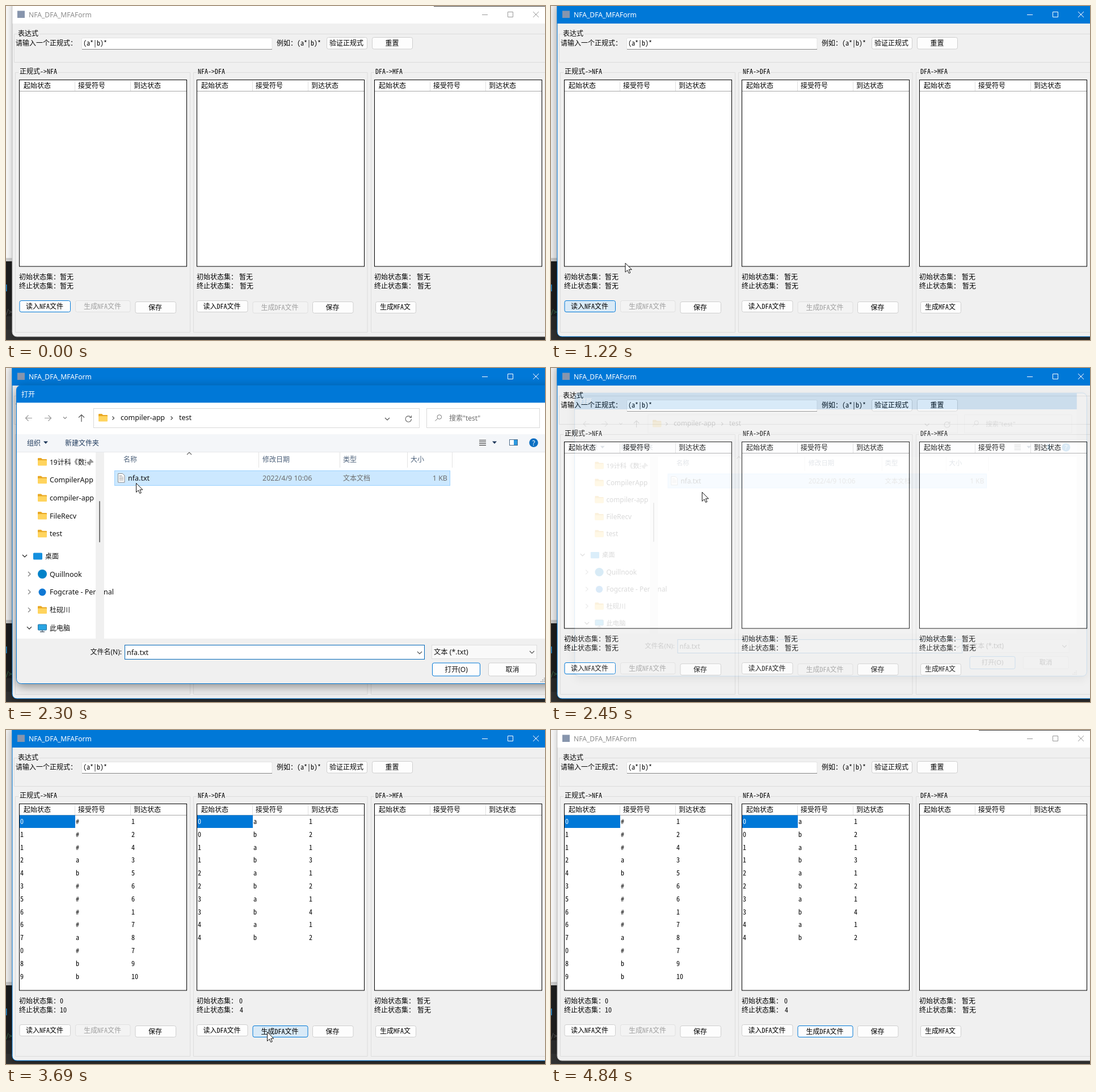
Recreate the animation shown at these times as an HTML page. Size 950x590 px, loop 4920 ms.

```html
<!DOCTYPE html>
<html lang="zh-CN">
<head>
<meta charset="utf-8">
<title>NFA_DFA_MFAForm</title>
<style>
html, body { margin: 0; height: 100%; overflow: hidden; background: #333; }
svg { display: block; width: 100vw; height: 100vh; }
text { white-space: pre; }
.form { font: 12px "Noto Sans Mono CJK SC", "Noto Sans CJK SC", "Noto Sans CJK", monospace; }
.ui { font-family: "Noto Sans", "Open Sans", "Noto Sans CJK SC", "Noto Sans CJK", sans-serif; }
.shadow { filter: drop-shadow(0 5px 9px rgba(0, 0, 0, .42)); }
.soft { filter: drop-shadow(0 3px 6px rgba(0, 0, 0, .22)); }
</style>
</head>
<body>
<svg id="stage" viewBox="0 0 950 590"></svg>
<script>
const LOOP = 4920, BLUE = '#0078d7', INK = '#111', GREY = '#6d6d6d';
const NFA = '0#1 1#2 1#4 2a3 4b5 3#6 5#6 6#1 6#7 7a8 0#7 8b9 9b10'.split(' ');
const DFA = '0a1 0b2 1a1 1b3 2a1 2b2 3a1 3b4 4a1 4b2'.split(' ');

// Pointer way points: step, x, y
const TRACK = [
  [1, 470, 557], [4, 265, 545], [7, 103, 519], [8, 93, 523], [15, 93, 523],
  [21, 318, 107], [23, 318, 107], [27, 229, 203], [31, 229, 203], [37, 450, 298],
  [38, 450, 298], [39, 560, 442], [40, 604, 490], [42, 555, 525], [45, 465, 530],
  [48, 460, 533], [49, 460, 533], [53, 749, 554], [56, 845, 578]
];

const rect = (x, y, w, h, fill, stroke = 'none', r = 0) =>
  `<rect x="${x}" y="${y}" width="${w}" height="${h}" rx="${r}" fill="${fill}" stroke="${stroke}"/>`;
const path = (d, stroke, width = 1, fill = 'none') =>
  `<path d="${d}" stroke="${stroke}" stroke-width="${width}" fill="${fill}"/>`;
const disc = (x, y, r, fill) => `<circle cx="${x}" cy="${y}" r="${r}" fill="${fill}"/>`;
const label = (x, y, s, fill = '#000', anchor = 'start') =>
  `<text class="form" x="${x}" y="${y}" fill="${fill}" text-anchor="${anchor}">${s}</text>`;
const ui = (x, y, s, fill = INK, size = 12, anchor = 'start') =>
  `<text class="ui" x="${x}" y="${y}" fill="${fill}" font-size="${size}" text-anchor="${anchor}">${s}</text>`;

const chevron = (x, y, dir, color = '#555', s = 4) => {
  const turn = { down: 0, up: 180, right: -90 }[dir];
  return `<g transform="translate(${x} ${y}) rotate(${turn})">` +
    path(`M${-s} ${-s / 2}L0 ${s / 2}L${s} ${-s / 2}`, color, 1.2) + '</g>';
};
const triangle = (x, y) => path(`M${x - 4} ${y - 2}h8l-4 4.5z`, 'none', 0, '#1e395b');
const folder = (x, y) =>
  path(`M${x} ${y + 12}v-11q0-1 1-1h5l2 2h7q1 0 1 1v9z`, 'none', 0, '#e8a825') +
  rect(x, y + 4, 16, 9.5, '#ffd45e', 'none', 1);
const cross = (x, y, color) => path(`M${x - 5} ${y - 5}l10 10m0-10l-10 10`, color);

// look: '' | 'off' | 'focus' | 'hover'
function button(x, y, w, h, s, cx, base, look = '') {
  const active = look === 'focus' || look === 'hover';
  return rect(x, y, w, h, { hover: '#d9eaf7', off: '#f3f3f3' }[look] || '#fdfdfd',
      active ? BLUE : look === 'off' ? '#e0e0e0' : '#cfcfcf', 3) +
    label(cx, base, s, look === 'off' ? '#a0a0a0' : '#000', 'middle');
}

function grid(x, rows) {
  let out = rect(x + .5, 130.5, 295, 329.5, '#fff', '#000') +
    path(`M${x + 1} 150.5h294`, '#a8a8a8') +
    path(`M${x + 98.5} 132v18m98-18v18`, '#dedede');
  ['起始状态', '接受符号', '到达状态'].forEach((s, i) => out += label(x + [8, 104, 202][i], 145, s));
  if (rows.length) out += rect(x + 1, 150.5, 98, 22.5, BLUE);
  rows.forEach((row, i) => {
    const y = 166 + i * 22.8;
    out += label(x + 2, y, row[0], i ? '#000' : '#fff') +
      label(x + 100, y, row[1]) + label(x + 198, y, row.slice(2));
  });
  return out;
}

function backdrop(focused) {
  return rect(0, 0, 950, 590, '#333') + rect(0, 0, 30, 447, '#f7f7f7') +
    rect(0, 445, 30, 6, '#cfcfcf') + rect(0, 451, 30, 121, '#1e1e1e') +
    rect(0, 548, 30, 24, '#2b2b2b') +
    rect(0, 492, 1.5, 12, '#2492dc') + label(-1, 545, '/>', focused ? '#4d8a5c' : '#666');
}

function mainWindow(step, focused) {
  const nfa = step >= 33, dfa = step >= 47;
  const tone = focused ? '#fff' : '#999';
  let out = `<g class="${focused ? 'shadow' : 'soft'}">` +
    rect(11, -10, 960, 594, '#f0f0f0', focused ? BLUE : '#bbb', 8) + '</g>' +
    rect(focused ? 10.5 : 11.5, 0, 940, 31, focused ? BLUE : '#fff');
  if (!focused) out += rect(754, 0, 196, 1, '#444');
  out += rect(20, 8.5, 13, 12.5, '#8795ad') +
    ui(40, 20, 'NFA_DFA_MFAForm', focused ? '#fff' : '#8c8c8c', 12.1) +
    path('M839 15.5h10M884.5 10.5h9v9h-9z', tone) + cross(934, 15, tone);

  // Expression group
  out += path('M20 49.5H14.5V99.5H950M59 49.5H950', '#dcdcdc') +
    label(21, 53, '表达式') + label(17, 70, '请输入一个正规式：') +
    rect(133.5, 56.5, 335.5, 20, '#fff', '#e3e3e3', 2) + path('M134 76.5h335', '#868686') +
    label(136, 69.5, '(a*|b)*') + label(477, 70, '例如：(a*|b)*') +
    button(565.5, 55.5, 71, 20.5, '验证正规式', 600, 70) +
    button(645.5, 55.5, 71, 20.5, '重置', 680.5, 70);

  // Three automaton groups
  const panels = [
    ['正规式->NFA', 16.5, 324.5, 24, 67, nfa ? NFA : [], nfa && ['0', '10']],
    ['NFA->DFA', 330.5, 637, 338, 49, dfa ? DFA : [], dfa && ['0', '4']],
    ['DFA->MFA', 643.5, 960, 651, 49, [], null]
  ];
  panels.forEach(([name, left, right, tx, tw, rows, sets], i) => {
    const x = 23 + 313 * i, vx = [95, 411, 724][i];
    const [first, last] = sets || ['暂无', '暂无'];
    out += path(`M${tx - 2} 117.5H${left}V576.5H${right}V117.5H${tx + tw}`, '#dcdcdc') +
      label(tx, 120, name) + grid(x, rows) +
      label(x, 483, '初始状态集：') + label(vx, 483, first) +
      label(x, 499, '终止状态集：') + label(vx + (i > 0), 499, last);
  });

  const readLook = step >= 47 ? '' : step >= 8 && step < 18 ? 'hover' : 'focus';
  const makeLook = !nfa ? 'off' : step >= 44 && step < 51 ? 'hover' : step >= 47 ? 'focus' : '';
  return out +
    button(24, 520.5, 89.5, 20, '读入NFA文件', 68, 534.5, readLook) +
    button(122.5, 520.5, 96.5, 20, '生成NFA文件', 170, 534.5, 'off') +
    button(228, 522.5, 71.5, 20, '保存', 263, 536.5) +
    button(336.5, 520.5, 89.5, 20, '读入DFA文件', 380.5, 534.5) +
    button(435, 522.5, 97, 20, '生成DFA文件', 482.5, 536.5, makeLook) +
    button(540.5, 522.5, 71.5, 20, '保存', 575.5, 536.5) +
    button(651.5, 522.5, 71, 20, '生成MFA文', 686, 535.5);
}

function sidebar() {
  let out = '';
  ['19计科《数据', 'CompilerApp', 'compiler-app', 'FileRecv', 'test'].forEach((s, i) => {
    const y = 166 + i * 31.7;
    out += folder(56, y - 7) + ui(77, y + 4.5, s, INK, i ? 12.5 : 12);
  });
  out += rect(141, 155, 17, 22, '#fff') +
    path('M149 161l5 5-1 1-2-.5-2.5 2.5 0 2-1 1-5-5 1-1h2l2.5-2.5-.5-1.500zM146 168l-3 3', '#8a8a8a', .8, '#9a9a9a');
  out += chevron(33, 332, 'down', '#222') + rect(48, 326.5, 16, 12, '#1490df', 'none', 1.5) + ui(69, 336.5, '桌面');
  ['Quillnook', 'Fogcrate - Personal', '杜砚川', '此电脑'].forEach((s, i) => {
    const y = 364 + i * 31.7;
    out += chevron(41, y, i < 3 ? 'right' : 'down', i < 3 ? '#777' : '#222') +
      ui(77, y + 4.5, s, INK, i < 2 ? 12.5 : 12);
  });
  return out + disc(64, 364, 8, '#0082c9') + disc(64, 396, 6.5, '#1078d4') + folder(56, 420.5) +
    rect(56.5, 453, 15, 10, '#29a5e3', '#28719c', 1) + path('M64 463v3m-4 0h8', '#567', 1.4) +
    rect(158, 149, 15, 329, '#f0f0f0') + rect(164, 235, 2, 73, '#777', 'none', 1);
}

function dialog(step) {
  const picked = step >= 28, closing = step >= 30;
  let out = `<g class="shadow">${rect(18.5, 31, 950, 526.500, '#f0f0f0', BLUE, 8)}</g>` +
    path('M18.500 61.500V39q0-8 8-8H950V61.500z', 'none', 0, BLUE) + rect(19, 61.500, 931, 416.500, '#fff');
  if (!closing) out += rect(28, 39.500, 13, 12.500, '#c4d0e4') + cross(938, 46, '#fff');
  out += ui(closing ? 27 : 48, 50.500, '打开', '#fff');

  // Address bar
  out += path('M46 88.500H34.500m5-5l-5 5 5 5M68 88.500H79.500m-5-5l5 5-5 5', '#999', 1.2) +
    chevron(104, 88, 'down', '#888', 3) + path('M133 95V82.500m-5 5l5-5 5 5', '#555', 1.2) +
    rect(154.5, 71.5, 574, 34, '#fff', '#d9d9d9') + folder(163, 81) +
    chevron(189, 88.5, 'right', '#444', 3) + ui(202, 92, 'compiler-app', INK, 12.5) +
    chevron(292, 88.5, 'right', '#444', 3) + ui(305, 92, 'test', INK, 12.5) +
    chevron(672, 90, 'down') + path('M713.500 87a5.200 5.200 0 1 0 1 3M714.500 84v3.500h-3.500', '#666', 1.1) +
    rect(741.5, 71.5, 199, 34, '#fff', '#d9d9d9') +
    path('M760.5 89.5l-4 4M760 86.500a3.800 3.800 0 1 1 7.600 0a3.800 3.800 0 1 1-7.600 0', '#777') +
    ui(781, 92.5, '搜索"test"', GREY);

  // Toolbar
  out += rect(19, 117, 931, 31, '#f4f6f9') + path('M19 148.5H950', '#e6e8eb') +
    ui(37, 136.5, '组织', '#1e395b') + triangle(70, 131.5) + ui(104, 136.5, '新建文件夹', '#1e395b') +
    path('M834 127.500h12m-12 3h12m-12 3h12m-12 3h12', '#333', 1.2) + triangle(861, 131.5) +
    rect(887.5, 126.5, 14, 10, '#fff', '#4b6a88') + rect(895, 127, 6, 9, '#2d9ae0') +
    disc(930, 132, 7.8, '#0a6fc2') + ui(930, 136.5, '?', '#fff', 12, 'middle');

  // File list
  out += sidebar() + chevron(323, 151, 'up', '#666') +
    path('M445.5 149v27M588.5 149v27M707.5 149v27M786.5 149v27', '#e2e2e2');
  [[207, '名称'], [452, '修改日期'], [594, '类型'], [713, '大小']]
    .forEach(([x, s]) => out += ui(x, 166, s, '#4c607a'));
  if (step >= 27) {
    out += picked ? rect(191.5, 181.5, 591, 26, '#cce8ff', '#99d1ff') : rect(191, 181, 592, 27, '#e5f3ff');
  }
  out += path('M197.5 186.500h8l3.500 3.500v12h-11.500z', '#8a8a8a', 1, '#fff') +
    path('M199.5 190.500h5m-5 2.500h7.500m-7.500 2.500h7.500m-7.500 2.500h7.500', '#999') +
    ui(215, 199, 'nfa.txt', INK, 12.5) + ui(452, 199, '2022/4/9 10:06', GREY, 12.5) +
    ui(594, 199, '文本文档', GREY) + ui(778, 199, '1 KB', GREY, 12.5, 'end');

  // Footer
  out += ui(204, 506, '文件名(N):', INK, 12, 'end') +
    rect(209.5, 489.5, 528, 25, '#fff', '#0067b8') + chevron(729, 503, 'down') +
    (picked ? ui(213, 507, 'nfa.txt', INK, 12.5) : rect(213, 494, 1.8, 17, '#000')) +
    rect(750.5, 489.5, 185, 24, '#f9f9f9', '#dedede') + ui(754, 506, '文本 (*.txt)', INK, 12.3) +
    chevron(927, 502, 'down') +
    rect(751.5, 521, 84, 23, '#fdfdfd', BLUE, 3) + ui(793.5, 536.5, '打开(O)', INK, 12, 'middle') +
    rect(850.5, 521, 84, 23, '#fdfdfd', '#cfcfcf', 3) + ui(892.5, 536.5, '取消', INK, 12, 'middle');
  for (const [x, y] of [[948, 547], [945, 550], [948, 550], [942, 553], [945, 553], [948, 553]])
    out += rect(x, y, 2, 2, '#b5b5b5');

  const fade = Math.max(0, step - 30);
  return `<g opacity="${[1, .6, .15][fade]}" transform="translate(485 294) scale(${1 - fade * .025}) translate(-485 -294)">${out}</g>`;
}

function pointer(step) {
  const n = TRACK.findIndex(p => p[0] >= step);
  if (step < 1 || n < 0) return '';
  const b = TRACK[n], a = TRACK[n - 1] || b;
  const k = a === b ? 0 : (step - a[0]) / (b[0] - a[0]);
  const at = i => a[i] + (b[i] - a[i]) * k;
  return `<g transform="translate(${at(1)} ${at(2)})">` +
    path('M.5 .5V16.500l3.800-3.500 2.500 5.500 2.500-1.100-2.500-5.400h5z', '#111', 1, '#fff') + '</g>';
}

const stage = document.getElementById('stage');
let shown = -1;
function draw() {
  const step = Math.floor((performance.now() % LOOP + 25) / 77);
  if (step !== shown) {
    shown = step;
    const focused = step >= 12 && step < 18 || step >= 30 && step < 63;
    stage.innerHTML = backdrop(focused) + mainWindow(step, focused) +
      (step >= 19 && step <= 32 ? dialog(step) : '') + pointer(step);
  }
  requestAnimationFrame(draw);
}
draw();
</script>
</body>
</html>
```
